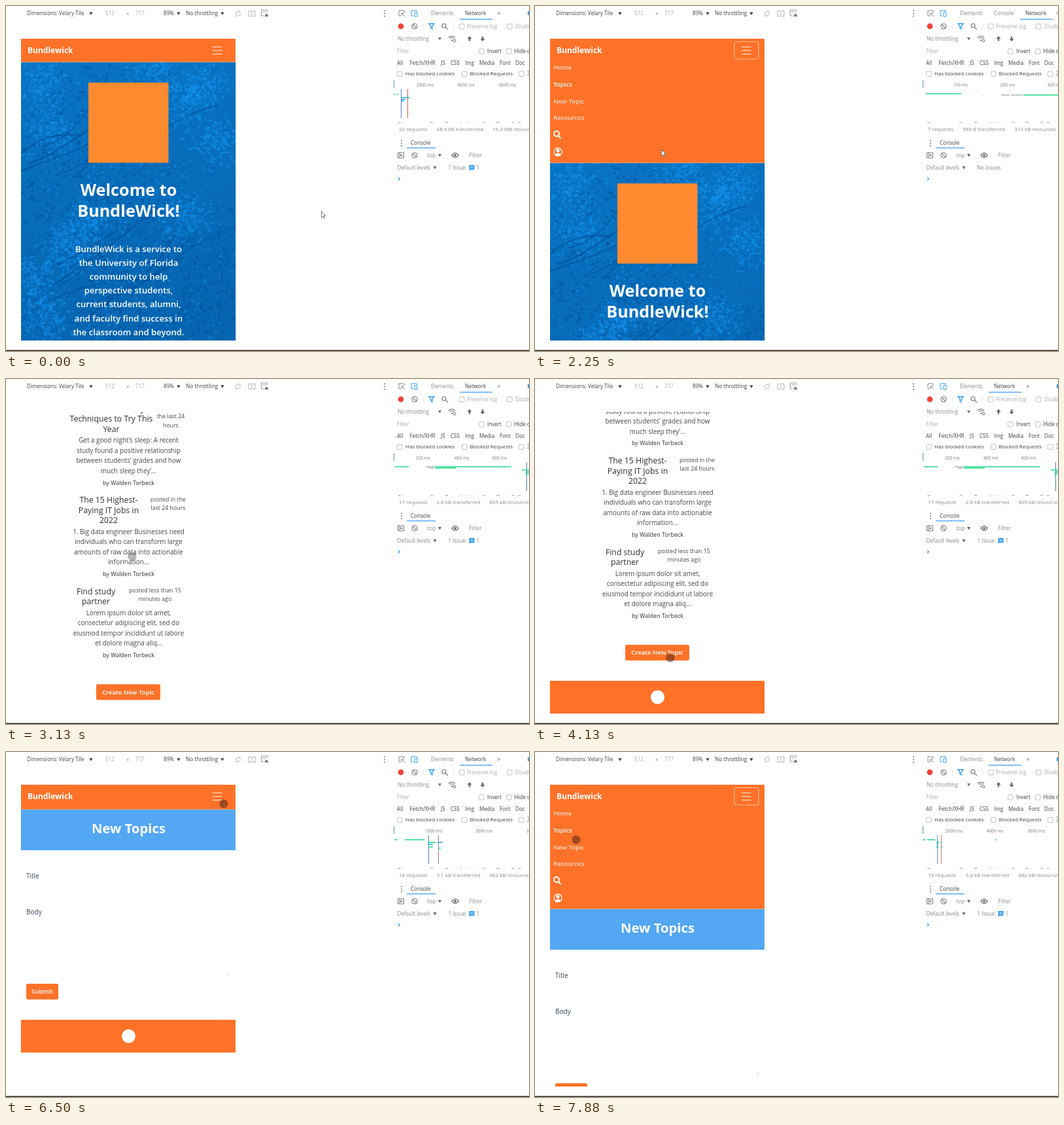
These frames come from a looping animation (800 px wide and 527 px high, 8000 ms). An HTML page with a canvas:

```html
<!DOCTYPE html>
<html lang="en">
<head>
<meta charset="utf-8">
<title>Mobile page in a device view</title>
<style>
html, body { margin: 0; width: 100%; height: 100%; overflow: hidden; background: #fff; }
canvas { display: block; }
</style>
</head>
<body>
<canvas id="stage" width="800" height="527"></canvas>
<script>
const LOOP = 8000;
const ORANGE = '#ff7228', SKY = '#54a7f2', INK = '#3c4043', GREY = '#85888c', PALE = '#a9acb0',
      LINK = '#2f9cf4', GREEN = '#2fdc90', TEAL = '#28b5c4';
const FONT = '"Open Sans", "Noto Sans", sans-serif';
const VIEW = { x: 22.6, y: 50, w: 328.7, h: 461 };
const NAV = 36, MENU = 154;
const ctx = document.getElementById('stage').getContext('2d');

// Drawing helpers
function text(s, x, y, size = 8.1, color = INK, weight = 400, align = 'left') {
  ctx.font = `${weight} ${size}px ${FONT}`;
  ctx.fillStyle = color;
  ctx.textAlign = align;
  ctx.fillText(s, x, y + size * 0.35);
  return ctx.measureText(s).width;
}
function lines(list, x, y, pitch, size, color, weight) {
  list.forEach((s, i) => text(s, x, y + i * pitch, size, color, weight, 'center'));
}
function rect(x, y, w, h, color) {
  ctx.fillStyle = color;
  ctx.fillRect(x, y, w, h);
}
function box(x, y, w, h, r, fill, stroke, width = 1) {
  ctx.beginPath();
  ctx.roundRect(x, y, w, h, r);
  if (fill) { ctx.fillStyle = fill; ctx.fill(); }
  if (stroke) { ctx.strokeStyle = stroke; ctx.lineWidth = width; ctx.stroke(); }
}
function disc(x, y, r, color) {
  ctx.beginPath();
  ctx.arc(x, y, r, 0, 7);
  ctx.fillStyle = color;
  ctx.fill();
}
function stroke(d, x, y, color, width = 1, fill) {
  const path = new Path2D(d);
  ctx.save();
  ctx.translate(x, y);
  if (fill) { ctx.fillStyle = fill; ctx.fill(path); }
  ctx.strokeStyle = color;
  ctx.lineWidth = width;
  ctx.stroke(path);
  ctx.restore();
}
function shape(d, x, y, color) { stroke(d, x, y, color, 0.01, color); }
const caret = (x, y, color = INK) => shape('M-2.6-2H2.6L0 2.6Z', x, y, color);
const check = (x, y) => box(x - 3.5, y - 3.5, 7.5, 7.5, 1, '#fff', '#b0b0b0', 0.8);
const dots = (x, y) => [-4, 0, 4].forEach(d => disc(x, y + d, 1, '#6e7277'));
const ban = (x, y) => stroke('M4 0A4 4 0 1 1-4 0A4 4 0 1 1 4 0M-2.8-2.8L2.8 2.8', x, y, '#6e7277', 1.1);

// Interpolation over rows of [time, ...values]
function track(rows, t, ease = p => p) {
  let i = 0;
  while (i < rows.length - 2 && t >= rows[i + 1][0]) i++;
  const [a, b] = [rows[i], rows[i + 1]];
  const p = ease(Math.min(1, Math.max(0, (t - a[0]) / (b[0] - a[0]))));
  return a.slice(1).map((v, k) => v + (b[k + 1] - v) * p);
}
const smooth = p => p * p * (3 - 2 * p);

const POINTER = [
  [130, 482, 313], [620, 338, 78], [1080, 338, 78], [1550, 46, 122], [1750, 46, 122],
  [2200, 193, 219], [2350, 193, 219], [2700, 193, 271], [3450, 193, 271], [4000, 207, 426],
  [4400, 207, 426], [5150, 190, 240], [5500, 190, 240], [6250, 333, 79], [6700, 333, 79],
  [7500, 63, 134], [8000, 63, 134]
];
const SCROLL = [[2600, 0], [2750, 55], [3000, 120], [3400, 209.5]];

// Blue two-tone foliage backdrop
const foliage = (() => {
  const c = document.createElement('canvas');
  c.width = 330;
  c.height = 620;
  const g = c.getContext('2d');
  let seed = 11;
  const rnd = () => (seed = seed * 16807 % 2147483647) / 2147483647;
  const bell = () => rnd() + rnd() + rnd() - 1.5;
  const base = g.createLinearGradient(0, 0, 120, 460);
  base.addColorStop(0, '#0874c4');
  base.addColorStop(1, '#0665b0');
  g.fillStyle = base;
  g.fillRect(0, 0, c.width, c.height);
  const leaves = (n, color, spread, centres) => {
    g.fillStyle = color;
    for (let i = 0; i < n; i++) {
      const [x, y] = centres[i % centres.length];
      g.beginPath();
      g.ellipse(x + bell() * spread, y + bell() * spread, 0.6 + rnd() * 3, 0.5 + rnd() * 1.6, rnd() * 3, 0, 7);
      g.fill();
    }
  };
  const branches = n => {
    for (let i = 0; i < n; i++) {
      const x = rnd() * 240 - 40, y = 120 + rnd() * 440;
      g.strokeStyle = 'rgba(0,70,138,.45)';
      g.lineWidth = 0.6 + rnd() * 2.4;
      g.beginPath();
      g.moveTo(x, y);
      g.bezierCurveTo(x + 30, y - 50 * rnd(), x + 70, y - 20 - 50 * rnd(), x + 90 + rnd() * 80, y - 50 - rnd() * 80);
      g.stroke();
    }
  };
  leaves(2200, 'rgba(0,74,146,.4)', 110, [[110, 20], [20, 190], [150, 190], [130, 340], [290, 300], [250, 420], [100, 520]]);
  leaves(2600, 'rgba(20,148,240,.5)', 38, [[30, 30], [45, 105], [280, 30], [255, 60], [300, 120], [100, 250],
    [70, 285], [25, 335], [40, 390], [205, 15], [250, 235]]);
  branches(26);
  leaves(900, 'rgba(24,152,242,.4)', 170, [[160, 120], [160, 400]]);
  return c;
})();

// Pages, drawn at their unscrolled place with the menu closed
function homePage() {
  ctx.drawImage(foliage, VIEW.x, VIEW.y + NAV);
  box(126, 117, 122.5, 122.5, 1, '#ff8a30');
  lines(['Welcome to', 'BundleWick!'], 187.5, 281, 32.5, 25.2, '#fff', 700);
  lines(['BundleWick is a service to', 'the University of Florida', 'community to help',
    'perspective students,', 'current students, alumni,', 'and faculty find success in',
    'the classroom and beyond.'], 187.5, 371, 21.2, 13.1, '#fff', 600);
}

const TOPICS = [
  { y: 195, x: 161, side: 252, title: ['10 Effective Study', 'Techniques to Try This', 'Year'],
    posted: ['posted in', 'the last 24', 'hours'],
    body: ['Get a good night’s sleep: A recent', 'study found a positive relationship',
      'between students’ grades and how', 'much sleep they’...'], by: 'Walden Torbeck' },
  { y: 334.5, x: 157, side: 248, title: ['The 15 Highest-', 'Paying IT Jobs in', '2022'],
    posted: ['posted in the', 'last 24 hours'],
    body: ['1. Big data engineer Businesses need', 'individuals who can transform large',
      'amounts of raw data into actionable', 'information...'], by: 'Walden Torbeck' },
  { y: 474, x: 137.5, side: 228, title: ['Find study', 'partner'],
    posted: ['posted less than 15', 'minutes ago'],
    body: ['Lorem ipsum dolor sit amet,', 'consectetur adipiscing elit, sed do',
      'eiusmod tempor incididunt ut labore', 'et dolore magna aliq...'], by: 'Walden Torbeck' }
];

function banner(title, y, h) {
  rect(VIEW.x, VIEW.y + NAV, VIEW.w, h, SKY);
  text(title, 187.5, y, 20.3, '#fff', 700, 'center');
}
function button(label, x, y, w) {
  box(x, y, w, 24, 2.5, ORANGE);
  text(label, x + w / 2, y + 12, 9.6, '#fff', 600, 'center');
}
function footer(y) {
  rect(VIEW.x, y, VIEW.w, 50, ORANGE);
  disc(187.5, y + 25, 10.5, '#fff');
}
function topicsPage() {
  banner('Topics', 117, 58);
  for (const { y, x, side, title, posted, body, by } of TOPICS) {
    const top = y + title.length * 15.4 + 2;
    lines(title, x, y, 15.4, 12.3, '#2b2f33');
    lines(posted, side, y - 1.5, 13.2, 8.8, '#42474c');
    lines(body, 187.5, top, 15.5, 9.9, '#42474c');
    text('by ' + by, 187.5, top + 64.5, 9, '#2b2f33', 400, 'center');
  }
  button('Create New Topic', 138, 615.5, 98);
  footer(670.5);
}
function newPage() {
  banner('New Topics', 115, 62);
  text('Title', 31, 187, 10, '#33475a');
  text('Body', 31, 242, 10, '#33475a');
  rect(340, 337, 1.5, 1.5, '#bbb');
  button('Submit', 31, 352, 49);
  footer(407);
}

function navbar(open, ring, active) {
  const h = NAV + MENU * open;
  ctx.save();
  ctx.beginPath();
  ctx.rect(VIEW.x, VIEW.y, VIEW.w, h);
  ctx.clip();
  rect(VIEW.x, VIEW.y, VIEW.w, h, ORANGE);
  text('Bundlewick', 33, 68, 12, '#fff', 700);
  if (ring) box(304, 54, 39, 28, 4, null, '#ffe3bf', 2.5);
  else if (open > 0.5) box(305, 54.5, 37, 26.5, 3.5, null, 'rgba(255,255,255,.5)', 1.2);
  for (const y of [62.5, 68, 73.5]) rect(316, y - 0.6, 14.5, 1.2, 'rgba(255,255,255,.75)');
  if (open > 0.02) {
    ['Home', 'Topics', 'New Topic', 'Resources'].forEach((s, i) =>
      text(s, 28, 94 + i * 25.6, 9.7, s === active ? '#fff' : 'rgba(255,255,255,.75)', 600));
    stroke('M3.4-1A4 4 0 1 1-4.6-1A4 4 0 1 1 3.4-1M2 2L6 6', 33.5, 196, '#fff', 2);
    stroke('M6 0A6 6 0 1 1-6 0A6 6 0 1 1 6 0', 35, 223, '#fff', 1.3);
    disc(35, 221, 2.5, '#fff');
    shape('M-4.5 4Q0-1 4.5 4Q0 8-4.5 4Z', 35, 223, '#fff');
  }
  rect(VIEW.x, VIEW.y + h - 1, VIEW.w, 1, 'rgba(255,255,255,.35)');
  ctx.restore();
}

// Network overviews: axis labels, bars [x, y, width, colour], vertical marks [x, colour]
const IDLE = {
  stats: ['22 requests', '48.4 kB transferred', '16.3 MB resources'],
  axis: [['2000 ms', 641], ['4000 ms', 703.5], ['6000 ms', 767]],
  bars: [[593, 135, 3, GREEN], [598, 135, 2, GREEN], [604, 140, 13, TEAL], [605, 143, 6, LINK], [605, 145, 3, TEAL]],
  marks: [[604, '#5577d8'], [614, '#e0524c']]
};
const LOADING = {
  stats: ['7 requests', '588 B transferred', '313 kB resources'],
  axis: [['100 ms', 651], ['200 ms', 723], ['300 ms', 795]],
  bars: [[598, 134, 54, GREEN], [684, 137, 2, '#ddd'], [713, 136, 13, '#bbb'], [728, 136, 18, '#bbb'], [747, 136, 53, GREEN]],
  marks: [], busy: true
};
const LISTED = {
  stats: ['17 requests', '2.8 kB transferred', '865 kB resources'],
  axis: [['200 ms', 638], ['400 ms', 697], ['600 ms', 755]],
  bars: [[595, 134, 21, GREEN], [642, 134, 13, '#bbb'], [647, 136, 8, '#bbb'], [656, 134, 117, GREEN],
    [656, 136, 32, GREEN], [789, 139, 11, GREEN], [795, 142, 5, TEAL], [794, 145, 6, GREEN]],
  marks: [[796, '#4a7f92']]
};
const FORM = {
  stats: ['18 requests', '3.1 kB transferred', '882 kB resources'],
  axis: [['1000 ms', 654], ['2000 ms', 731], ['3000 ms', 809]],
  bars: [[594, 134, 5, GREEN], [610, 134, 30, GREEN], [645, 138, 12, GREEN], [645, 141, 8, TEAL],
    [646, 145, 7, GREEN], [660, 138, 8, TEAL], [661, 147, 4, GREEN]],
  marks: [[646, '#5577d8'], [661, '#9572b8']]
};
const FORM_LATER = {
  stats: ['19 requests', '3.4 kB transferred', '882 kB resources'],
  axis: IDLE.axis,
  bars: [[593, 134, 4, GREEN], [600, 134, 12, GREEN], [614, 138, 4, TEAL], [614, 141, 3, GREEN],
    [614, 145, 3, TEAL], [620, 138, 3, GREEN], [621, 146, 2, TEAL], [704, 134, 2, GREEN]],
  marks: [[615, '#5c93cc'], [621, '#dd7d62']]
};

function deviceBar() {
  text('Dimensions: Velary Tile', 32, 11.5);
  caret(130, 11.5);
  text('512', 152, 11.5, 8.1, PALE);
  text('×', 184, 12, 8.1, GREY);
  text('717', 198, 11.5, 8.1, PALE);
  text('89%', 241, 11.5);
  caret(264, 11.5);
  text('No throttling', 275, 11.5, 8.3);
  caret(331, 11.5);
  stroke('M-4-1L1-4L4 1L-1 4ZM-4 3L-2 5M4-3L2-5', 355, 11.5, '#b5b5b5');
  stroke('M-1.5-4H-5V4H-1.5M1.5-4H5V4H1.5M0-5V5', 376, 11.5, '#b0b0b0');
  stroke('M4-2V-5H-5V4H-1M-3-2H2', 395.5, 11, '#999');
  shape('M0 5L2 1H4L6 5Z', 395.5, 11, '#777');
  dots(579, 11.5);
}

function tools(net) {
  stroke('M4-1V-4H-4V4H-1M0 0L5 5M0 4V0H4', 605, 11, '#888');
  stroke('M-1 4H-4V-4H4V-2M1-1H5V5H1Z', 624, 11, LINK);
  text('Elements', 650, 11.5, 8.1, GREY);
  const tab = net.busy ? 750 : 702;
  if (net.busy) text('Console', 702, 11.5, 8.1, GREY);
  else box(798, 8, 6, 6, 1, LINK);
  text('Network', tab, 11.5);
  rect(tab - 8, 19.5, 50, 1.4, SKY);
  text('»', net.busy ? 797 : 751, 10.5, 11, GREY);

  disc(604, 31, 4.4, '#f04438');
  ban(625, 31);
  rect(638, 27, 0.7, 8, '#ddd');
  stroke('M-4-4H4L1 0V4L-1 3V0Z', 651, 31, LINK, 1.3);
  stroke('M2-1A3 3 0 1 1-4-1A3 3 0 1 1 2-1M1 1L5 5', 671, 31, '#777', 1.1);
  rect(684, 27, 0.7, 8, '#ddd');
  check(697, 31); text('Preserve log', 705, 31, 8.1, PALE);
  check(770, 31); text('Disable cache', 779, 31, 8.1, PALE);

  text('No throttling', 599, 50, 8.1, GREY);
  caret(663.5, 50, '#777');
  stroke('M-5-2Q0-6 5-2M-3 0Q0-3 3 0M-1 2L0 3L1 2', 682, 50, '#666', 1.1);
  stroke('M3 3A2 2 0 1 1 3 2.9', 685, 50, '#666', 1);
  shape('M0-4L3.5 0H1.2V3.5H-1.2V0H-3.5Z', 709, 50, '#666');
  shape('M0 4L3.5 0H1.2V-3.5H-1.2V0H-3.5Z', 729, 50, '#666');

  text('Filter', 598, 69, 8.1, PALE);
  check(727, 69); text('Invert', 736, 69);
  check(769, 69); text('Hide data URLs', 777.5, 69);
  [['All', 598], ['Fetch/XHR', 617.5], ['JS', 665], ['CSS', 680], ['Img', 702], ['Media', 724],
    ['Font', 755], ['Doc', 779]].forEach(([s, x]) => text(s, x, 87));
  check(602, 103.5); text('Has blocked cookies', 611, 103.5, 8);
  check(701, 103.5); text('Blocked Requests', 709.5, 103.5, 8);
  check(788, 103.5); text('3rd-party requests', 797, 103.5);

  rect(593, 113, 1, 12, '#5b9bb0');
  net.axis.forEach(([s, x]) => text(s, x, 121, 6.6, '#777', 400, 'center'));
  net.marks.forEach(([x, color]) => rect(x, 127, 1, 44, color));
  net.bars.forEach(([x, y, w, color]) => rect(x, y - 0.8, w, 1.6, color));
  ctx.save();
  ctx.beginPath();
  ctx.rect(593, 174, 207, 5);
  ctx.clip();
  [['Name', 600], ['St...', 649], ['Type', 672], ['Initiator', 695], ['Size', 729], ['Time', 750],
    ['Fulf...', 773]].forEach(([s, x]) => text(s, x, 181.2, 8.1, GREY));
  ctx.restore();
  let x = 601;
  for (const s of net.stats) x += text(s, x, 188.5, 8, GREY) + 14;

  dots(605, 209.5);
  text('Console', 619, 209.5);
  rect(613, 216, 44, 1.4, SKY);
  stroke('M-4.5-4H4.5V4H-4.5ZM-2-4V4', 604, 228, '#777');
  shape('M-.5-2L3 0L-.5 2Z', 604, 228, '#777');
  ban(625, 228);
  text('top', 644.5, 228, 8.1, GREY);
  caret(663.5, 228, '#666');
  stroke('M-5 0Q0-7 5 0Q0 7-5 0Z', 687, 228, '#555', 1.2);
  disc(687, 228, 1.8, '#555');
  text('Filter', 708.5, 228.5, 8.1, GREY);
  text('Default levels', 598.5, 247, 8.1, GREY);
  caret(656, 247, '#666');
  if (net.busy) text('No Issues', 676, 247, 8.1, GREY);
  else {
    text('1 Issue:', 676.5, 247, 8.1, GREY);
    shape('M-4-4H4V3H-2L-4 5Z', 712.5, 247, LINK);
    rect(710.5, 245, 4, 0.8, '#fff');
    rect(710.5, 247, 4, 0.8, '#fff');
    text('1', 719.5, 247, 8.1, GREY);
  }
  stroke('M-1.2-2.4L1.4 0L-1.2 2.4', 601, 264, LINK, 1.2);
}

function pointer(t) {
  const [x, y] = track(POINTER, t, smooth);
  const arrow = x > VIEW.x + VIEW.w || (t > 1750 && t < 2480);
  if (arrow) stroke('M0 0V9.5L2.2 7.6L3.8 11L5.2 10.3L3.7 7H6.6Z', x + 0.5, y + 0.5, '#666', 0.9, '#fff');
  else disc(x, y, 6.6, y > 260 && y < 380 ? 'rgba(40,40,40,.34)' : 'rgba(40,25,25,.45)');
}

function draw(t) {
  const home = t < 2480, list = !home && t < 4300;
  const openAt = home ? 675 : 6477;
  const open = list ? 0 : smooth(Math.min(1, Math.max(0, (t - openAt) / 350)));
  const ring = (t > 720 && t < 1250) || (t > 6580 && t < 6950);
  const active = (home && t > 1500) || t > 7400 ? 'Topics' : '';
  const scroll = list ? track(SCROLL, t)[0] : 0;
  const net = t < 1900 ? IDLE : home ? LOADING : t < 4560 ? LISTED : t < 7250 ? FORM : FORM_LATER;

  rect(0, 0, 800, 527, '#fff');
  deviceBar();
  tools(net);
  ctx.save();
  ctx.beginPath();
  ctx.rect(VIEW.x, VIEW.y, VIEW.w, VIEW.h);
  ctx.clip();
  ctx.translate(0, -scroll);
  ctx.save();
  ctx.translate(0, MENU * open);
  (home ? homePage : list ? topicsPage : newPage)();
  ctx.restore();
  navbar(open, ring, active);
  ctx.restore();
  pointer(t);
  rect(0, 525.5, 800, 1.5, '#2a2a2a');
}

const start = performance.now();
function tick() {
  draw((performance.now() - start) % LOOP);
  requestAnimationFrame(tick);
}
tick();
</script>
</body>
</html>
```
